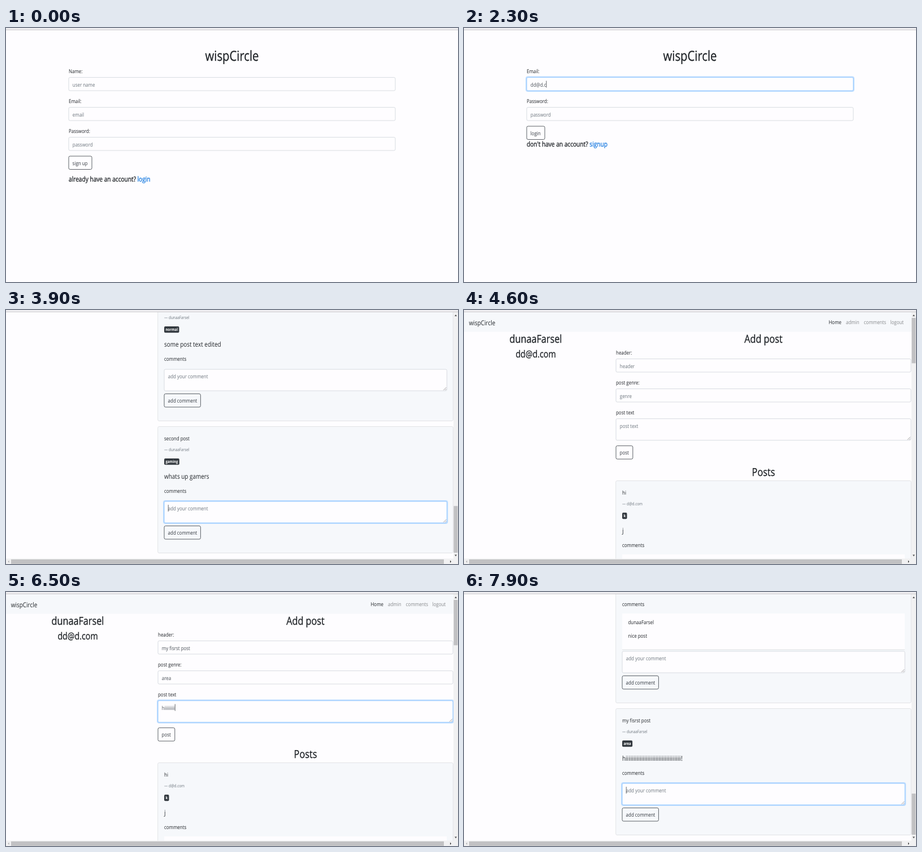
An HTML page for the animation above (8000 ms loop, 800 px wide and 450 px high).

```html
<!DOCTYPE html>
<html lang="en">
<head>
<meta charset="utf-8">
<style>
  html, body { margin: 0; width: 100%; height: 100%; overflow: hidden; background: #fefdff; }
  svg { display: block; }
  text { font-family: "Open Sans", "Noto Sans", sans-serif; text-rendering: geometricPrecision; }
</style>
</head>
<body>
<svg id="stage" width="800" height="450" viewBox="0 0 800 450"></svg>
<script>
const LOOP = 8000, STEP = 100;
const FONT = '"Open Sans", "Noto Sans", sans-serif';
const INK = '#212529', GREY = '#6c757d', DARK = '#343a40', PANEL = '#f6f8fb', PAGE = '#fefdff';
const ASPECT = 0.832;        // the whole page is shown narrower than it is tall
const EM = 0.598;            // page pixels to stage pixels, vertically
const SITE = 'wispCircle', USER = 'dunaaFarsel', MAIL = 'dd@d.com';
const CARD = 224, COMMENT = 65, GAP = 10, FIRST_CARD = 302.5, VIEW_BOTTOM = 430.5;

const stage = document.getElementById('stage');
const ctx = document.createElement('canvas').getContext('2d');

function textWidth(s, size = 16, weight = 400) {
  ctx.font = `${weight} 100px ${FONT}`;
  return ctx.measureText(s).width * size * EM * ASPECT / 100;
}

function text(x, y, s, size = 16, fill = INK, attrs = '') {
  return `<text transform="translate(${x} ${y}) scale(${ASPECT} 1)" font-size="${size * EM}" fill="${fill}" ${attrs}>${s}</text>`;
}

const medium = (x, y, s, size, fill = INK, attrs = '') =>
  text(x, y, s, size * 1.02, fill, `stroke="${fill}" stroke-width=".35" ${attrs}`);

const heading = (x, y, s, size) => medium(x, y, s, size, INK, 'text-anchor="middle"');

const rect = (x, y, w, h, fill, attrs = '') =>
  `<rect x="${x}" y="${y}" width="${w}" height="${h}" fill="${fill}" ${attrs}/>`;

const ring = (x, y, w, h, colour) =>
  rect(x - 1, y - 1, w + 2, h + 2, 'none', `rx="3" stroke="${colour}" stroke-width="2"`);

// Input or textarea; `misspelt` is [start, end] of the underlined characters.
function field(x, y, w, h, hint, value = '', focus = false, misspelt) {
  const tx = x + 6.8, base = y + 16.3, area = h > 30;
  let out = focus ? ring(x, y, w, h, '#bfdeff') : '';
  out += rect(x, y, w, h, PAGE, `rx="2.2" stroke="${focus ? '#80bdff' : '#ced4da'}" stroke-width=".8"`);
  out += text(tx, base, value || hint, 16, value ? '#495057' : GREY);
  if (misspelt) {
    const [a, b] = misspelt.map(n => tx + textWidth(value.slice(0, n)));
    out += `<path d="M${a} ${base + 1.3}H${b}" stroke="#e8474c" stroke-width="1.2" stroke-dasharray="1.5 .5"/>`;
  }
  if (focus) out += rect(tx + textWidth(value), y + 6, 0.7, 12, INK);
  if (area) {
    const r = x + w - 1, b = y + h - 1;
    out += `<path d="M${r - 5} ${b}L${r} ${b - 5}M${r - 2} ${b}L${r} ${b - 2}" stroke="#777" stroke-width=".7"/>`;
  }
  return out;
}

function button(x, y, w, label, focus = false) {
  return (focus ? ring(x, y, w, 23.5, '#8f9296') : '') +
    rect(x, y, w, 23.5, 'none', `rx="2.4" stroke="${DARK}" stroke-width=".8"`) +
    text(x + 6.6, y + 15.6, label, 16, DARK);
}

const typed = (s, step, start, rate) => s.slice(0, Math.max(0, Math.floor((step - start) * rate)));
const within = (step, from, to) => step >= from && step < to;

function form(rows) {
  return heading(400, 58, SITE, 40) + rows.map(([label, hint, value, focus], i) =>
    text(111, 79.6 + i * 53, label) + field(111, 87.6 + i * 53, 578, 23.4, hint, value, focus)).join('');
}

function signUp(k) {
  return form([
    ['Name:', 'user name', typed(USER, k, 1, 2), within(k, 1, 8)],
    ['Email:', 'email', typed(MAIL, k, 8, 2.67), within(k, 8, 12)],
    ['Password:', 'password', typed('•••', k, 11.5, 2), within(k, 12, 14)],
  ]) + button(111, 227, 41, 'sign up', k >= 14) +
    medium(111, 272, 'already have an account?', 20) + medium(232.5, 272, 'login', 20, '#1a7be0');
}

function logIn(k) {
  return form([
    ['Email:', 'email', typed(MAIL, k, 17, 1), within(k, 17, 26)],
    ['Password:', 'password', typed('•••', k, 25, 1.5), within(k, 26, 28)],
  ]) + button(111, 174, 32, 'login', k >= 28) +
    medium(111, 209.7, "don't have an account?", 20) + medium(222.3, 209.7, 'signup', 20, '#1a7be0');
}

const TITLE = 'my fisrst post', GENRE = 'area', BODY = 'h' + 'i'.repeat(39) + '!';

function posts(k) {
  const list = [
    ['hi', 'd@d.com', 'k', 'j', ['hello', 'hi']],
    ['hello', 'd@d.com', 'normal', 'some text', ['nice']],
    ['new post', 'd@d.com', 'normal', 'post text', ['good']],
    ['test', 'd@d.com', 'news', 'hello all', []],
    ['post', USER, 'normal', 'some text', []],
    ['first post', USER, 'normal', 'some post text edited', []],
    ['second post', USER, 'gaming', 'whats up gamers', k >= 46 ? ['nice post'] : []],
  ];
  if (k >= 74) list.push([TITLE, USER, GENRE, BODY, []]);
  return list;
}

const cardHeight = post => CARD + COMMENT * post[4].length;

function card(y, post, draft, focus, pressed) {
  const [title, author, genre, body, comments] = post;
  let out = rect(268.7, y, 522.6, cardHeight(post), PANEL, 'rx="2.4" stroke="#dcdee1" stroke-width=".8"');
  out += text(280, y + 24, title) + text(280, y + 43.5, '— ' + author, 12.8, GREY);
  out += rect(280, y + 56.4, textWidth(genre, 12, 700) + 4.8, 11.4, DARK, 'rx="2"');
  out += text(282.4, y + 64.8, genre, 12, '#fff', 'font-weight="700"');
  out += text(280, y + 92, body, 20) + text(280, y + 117, 'comments');
  comments.forEach((comment, i) => {
    const top = y + 130.5 + i * COMMENT;
    out += rect(280, top, 500, 64, PAGE) + rect(280, top + 63.8, 500, 0.8, '#d5d7da');
    out += text(290.5, top + 18.7, i || author !== USER ? 'd@d.com' : USER) + text(290.5, top + 43.3, comment);
  });
  const foot = y + comments.length * COMMENT;
  return out + field(280, foot + 132.6, 500.3, 38, 'add your comment', draft, focus) +
    button(280, foot + 176, 64.4, 'add comment', pressed);
}

function scrollbars(position, range) {
  const track = 416, view = 437, thumb = track * view / (view + range);
  const top = 14 + (track - thumb) * (range ? position / range : 0);
  return rect(792, 3, 8, 447, '#f1f1f2') + rect(0, 440.5, 800, 9.5, '#f1f1f2') +
    rect(792.4, top, 7, thumb, '#c1c1c3') + rect(9, 441.8, 766, 8, '#c1c1c3') +
    '<path d="M794 11h4l-2-3zM794 433.5h4l-2 3z" fill="#555"/>' +
    '<path d="M5.5 443.5v4.4l-2-2.2z" fill="#aaa"/><path d="M786 443.5v4.4l2-2.2z" fill="#333"/>';
}

function home(k) {
  const list = posts(k), last = list.length - 1;
  const height = list.reduce((sum, post) => sum + cardHeight(post) + GAP, -GAP);
  const range = FIRST_CARD + height - VIEW_BOTTOM;
  const part = within(k, 33, 46) ? Math.min(1, (k - 32) / 5) : k >= 75 ? Math.min(1, (k - 74) / 4) : 0;
  const filled = k < 74;
  const title = filled ? typed(TITLE, k, 48, 1.5) : '';
  const genre = filled ? typed(GENRE, k, 58, 1.34) : '';
  const body = filled ? typed(BODY, k, 63, 5.2) : '';
  const onTitle = within(k, 48, 58);

  let page = rect(0, 3, 792, 35.5, PANEL) + text(8.7, 26.5, SITE, 20);
  [['Home', 645.5], ['admin', 676], ['comments', 707.8], ['logout', 754.5]].forEach(([s, x], i) => {
    page += text(x, 25.4, s, 16, i ? '#87898c' : INK);
  });
  page += heading(127, 58, USER, 32) + heading(127, 84, MAIL, 28) + heading(530, 58, 'Add post', 32);
  page += text(269, 78.5, 'header:') +
    field(269, 86.6, 522, 23.4, 'header', title, onTitle, onTitle && title.length > 9 ? [3, 9] : null);
  page += text(269, 131.5, 'post genre:') + field(269, 139.6, 522, 23.4, 'genre', genre, within(k, 58, 63));
  page += text(269, 184.5, 'post text') +
    field(269, 192.6, 522, 38.2, 'post text', body, within(k, 63, 72), body && k >= 72 ? [0, 40] : null);
  page += button(269, 240.6, 29.8, 'post', within(k, 72, 74)) + heading(530, 293.6, 'Posts', 32);

  let y = FIRST_CARD;
  list.forEach((post, i) => {
    const active = i === last;
    const draft = active && k < 46 ? typed('nice post', k, 39, 1.8) : '';
    page += card(y, post, draft, active && (within(k, 39, 45) || k >= 79), active && k === 45);
    y += cardHeight(post) + GAP;
  });
  return `<g transform="translate(0 ${-part * range})">${page}</g>` + scrollbars(part * range, range);
}

function draw(k) {
  const page = k < 16 ? signUp(k) : k < 29 ? logIn(k) : home(k);
  stage.innerHTML = rect(0, 0, 800, 450, PAGE) + page +
    rect(0, 0, 800, 3, '#f0eff2') + rect(0, 2.9, 800, 0.9, '#c6c5c8');
}

let shown = -1;
function tick() {
  const k = Math.floor(performance.now() % LOOP / STEP);
  if (k !== shown) draw(shown = k);
  requestAnimationFrame(tick);
}
tick();
</script>
</body>
</html>
```
